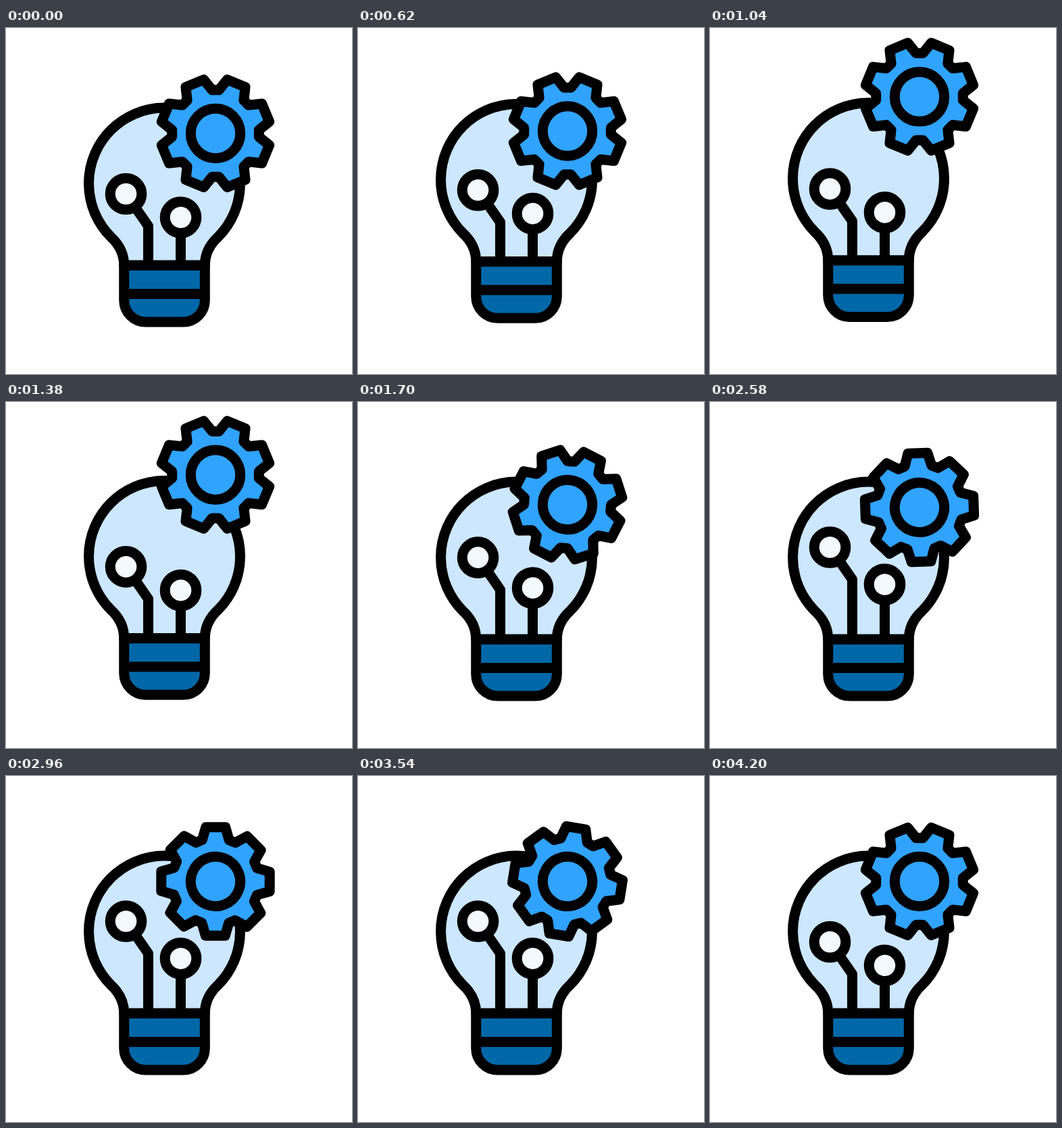
These frames come from a looping animation (512x512 px, 4820 ms). An HTML page:

```html
<!DOCTYPE html>
<html lang="en">
<head>
<meta charset="utf-8">
<title>Idea</title>
<style>
  html, body { margin: 0; height: 100%; overflow: hidden; background: #fff; }
  svg { display: block; width: 100vw; height: 100vh; }
</style>
</head>
<body>
<svg viewBox="0 0 512 512" fill="none" stroke="#000" stroke-width="15" stroke-linejoin="round" stroke-linecap="round">
  <g id="bulb">
    <path fill="#cce7ff" d="M174.7 351.3C174.7 334 167 320 155 309A112 112 0 1 1 314 309C302 320 294.3 334 294.3 351.3Z"/>
    <path fill="#0068a9" d="M174.7 351.3V403a32 32 0 0 0 32 32h55.6a32 32 0 0 0 32-32V351.3ZM174.7 393.5h119.6"/>
    <path id="wireA"/>
    <path id="wireB"/>
    <circle id="nodeA" cx="177.5" r="23.3" fill="#f2f9ff"/>
    <circle id="nodeB" cx="258.5" r="23.3" fill="#f2f9ff"/>
  </g>
  <g id="gear" fill="#30a3ff">
    <path id="teeth"/>
    <circle r="36.7"/>
  </g>
</svg>
<script>
const LOOP = 4820;
const el = id => document.getElementById(id);
const set = (id, name, value) => el(id).setAttribute(name, value);

// Each key is [time, value]; sine easing joins neighbours.
function track(keys, t) {
  for (let i = 1; i < keys.length; i++) {
    const [t0, a] = keys[i - 1], [t1, b] = keys[i];
    if (t <= t0) return a;
    if (t < t1) return a + (b - a) * (1 - Math.cos(Math.PI * (t - t0) / (t1 - t0))) / 2;
  }
  return keys[keys.length - 1][1];
}

const bulbY = [[0, 0], [407, 16], [705, -10.5], [1620, 0]];
const gearY = [[0, 0], [410, 8], [1200, -61], [1800, 0]];
const gearTurn = [[1535, 0], [3825, 360]];
const nodeLift = [[1390, 0], [2010, 1], [3580, 1], [4200, 0]];

function gearOutline() {
  const points = [];
  for (let i = 0; i < 8; i++) {
    for (const [deg, r] of [[4.5, 64.5], [12.3, 81.5], [32.7, 81.5], [40.5, 64.5]]) {
      const a = (i * 45 + deg) * Math.PI / 180;
      points.push((r * Math.sin(a)).toFixed(2) + " " + (-r * Math.cos(a)).toFixed(2));
    }
  }
  return "M" + points.join("L") + "Z";
}

function draw(t) {
  const lift = track(nodeLift, t);
  const a = 245.5 - 30.5 * lift, b = 280.3 - 10.3 * lift;
  set("nodeA", "cy", a);
  set("nodeB", "cy", b);
  set("wireA", "d", `M177.5 ${a}L210.5 ${a + 47.5}V351`);
  set("wireB", "d", `M258.5 ${b}V351`);
  set("bulb", "transform", `translate(0 ${track(bulbY, t)})`);
  set("gear", "transform", `translate(310 ${156 + track(gearY, t)}) rotate(${track(gearTurn, t)})`);
}

set("teeth", "d", gearOutline());
const start = performance.now();
function tick() {
  draw((performance.now() - start) % LOOP);
  requestAnimationFrame(tick);
}
tick();
</script>
</body>
</html>
```
